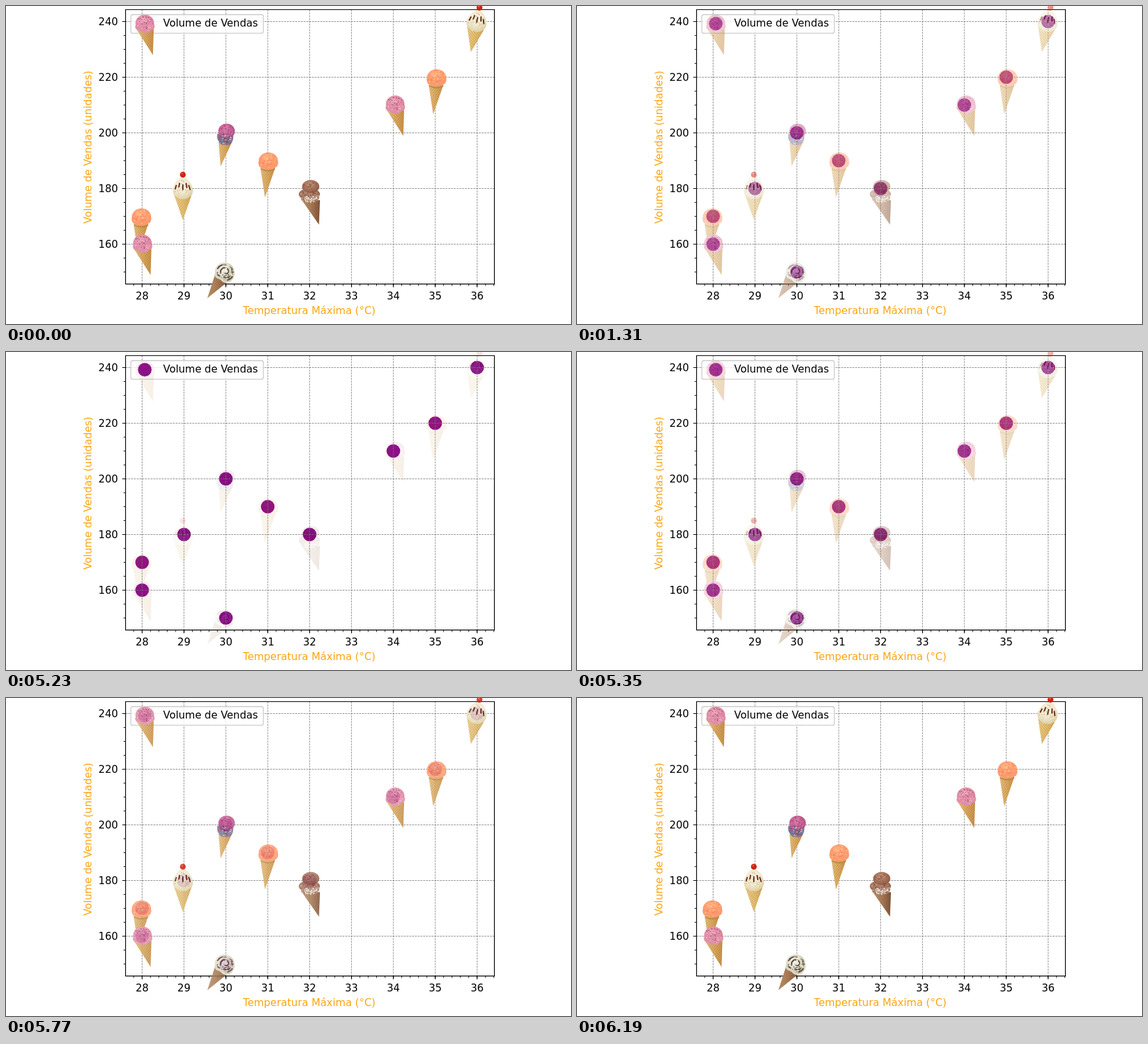
An HTML page that plays this animation: 853 px wide and 480 px high, repeating every 7.46 s.

```html
<!DOCTYPE html>
<html lang="pt">
<head>
<meta charset="utf-8">
<title>Volume de Vendas</title>
<style>
html, body { margin: 0; width: 100%; height: 100%; overflow: hidden; background: #fff; }
svg { display: block; width: 853px; height: 480px; }
text { font: 15.5px "DejaVu Sans", sans-serif; }
.axis { fill: #fca510; }
</style>
</head>
<body>
<svg id="stage" viewBox="0 0 853 480"></svg>
<script>
const LOOP = 7460, STEP = 60;
const L = 180.5, R = 737.4, T = 5.5, B = 419.6;
const px = v => 205.5 + (v - 28) * 63.22;
const py = v => 23.5 + (240 - v) * 4.2;

let seed = 7;
const rnd = () => (seed = (seed * 16807) % 2147483647) / 2147483647;
const range = (a, b, s) => Array.from({ length: Math.round((b - a) / s) + 1 }, (_, i) => a + i * s);
const path = (d, attrs) => `<path d="${d}" ${attrs}/>`;

// Scattered short flecks inside an ellipse.
function flecks(cx, cy, rx, ry, n, colors, size = 1.1) {
  let s = '';
  for (let i = 0; i < n; i++) {
    const a = rnd() * 2 * Math.PI, d = Math.sqrt(rnd());
    const x = cx + Math.cos(a) * d * rx, y = cy + Math.sin(a) * d * ry;
    const dx = (rnd() - .5) * 3, dy = (rnd() - .5) * 2;
    s += path(`M${x.toFixed(1)} ${y.toFixed(1)}l${dx.toFixed(1)} ${dy.toFixed(1)}`,
      `stroke="${colors[i % colors.length]}" stroke-width="${size}" stroke-linecap="round"`);
  }
  return s;
}

const ball = (id, light, mid, dark) => `<radialGradient id="${id}" cx=".42" cy=".36" r=".66">
  <stop offset="0" stop-color="${light}"/><stop offset=".6" stop-color="${mid}"/>
  <stop offset="1" stop-color="${dark}"/></radialGradient>`;
const wafer = (id, light, mid, dark) => `<linearGradient id="${id}">
  <stop offset="0" stop-color="${light}"/><stop offset=".5" stop-color="${mid}"/>
  <stop offset="1" stop-color="${dark}"/></linearGradient>`;
const scoop = (fill, cx, cy, rx, ry) =>
  `<ellipse cx="${cx}" cy="${cy}" rx="${rx}" ry="${ry}" fill="url(#${fill})"/>`;
const cone = (d, fill) => path(d, `fill="url(#${fill})"`) + path(d, 'fill="url(#mesh)"');

const flavours = {
  rose: () => cone('M-12 9L12.3 47L13.5 8Z', 'gold') + scoop('roseBall', 0, -1, 14, 13) +
    path('M-14.5 4Q-14 10-9 9Q-4 15 2 13Q6 15 10 9Q15 10 15 2L12-2H-12Z', 'fill="#e08fa9"') +
    flecks(0, 0, 13, 11, 40, ['#c9668b', '#f3b3c6', '#d67c9c', '#f5bccb'], 1.3) +
    flecks(0, -1, 12, 10, 16, ['#84384f', '#9c4565'], .9),

  peach: () => cone('M-12 9L-5 54L10.5 9Z', 'gold') +
    path('M-11 11Q0 17 10 11', 'fill="none" stroke="#b98a3c" stroke-width="1.5"') +
    scoop('peachBall', 0, -1.5, 14.5, 12.5) +
    path('M-15 0Q-15 9-10 9Q-5 13 0 11Q6 13 10 9Q15 8 15 0Z', 'fill="#fb9a70"') +
    flecks(0, -1, 14, 11, 56, ['#ffb681', '#fb8157', '#ffc493', '#ff8a66', '#fcae62'], 1.4),

  cream: () => cone('M-13 11L0 48L13 11Z', 'honey') +
    path('M-5-15Q0-18 5-15Q14-8 15.3 3Q15 11 10 13Q5 18 0 16Q-5 18-10 13Q-15 11-15.3 3Q-14-8-5-15Z', 'fill="url(#creamBall)"') +
    flecks(0, 5, 13, 9, 36, ['#d1c396', '#fff7de', '#b9b98a', '#e0cfa8']) +
    flecks(0, -9, 7, 5, 12, ['#dccda4', '#fff8e6', '#c5ad86']) +
    path('M-10-4L-11.5 1M-5-7L-6-2M0-5V2M5-7L6-1M9-4L11 2',
      'fill="none" stroke="#64301f" stroke-width="2" stroke-linecap="round"') +
    '<circle cy="-20.3" r="4.4" fill="#cf2412"/><circle cx="-1.2" cy="-22" r="1.1" fill="#f0755c"/>',

  party: () => cone('M-11 13L-8 49L9 13Z', 'gold') +
    path('M-13 0Q-14 9-10 12Q-7 18-2 16Q4 19 8 14Q12 10 11 0Z', 'fill="#84708e"') +
    scoop('partyBall', 1, -4, 12.5, 11.5) +
    flecks(2, -5, 11, 9, 36, ['#d45a91', '#a9437f', '#e58ab2', '#95549a', '#c04c84'], 1.3) +
    flecks(-1, 8, 11, 8, 44, ['#4d82bd', '#574069', '#d3a65f', '#67a8c8', '#a83f72', '#d9c7c8'], 1.4),

  choco: () => cone('M-10 8L14.5 43L16 6Z', 'cocoa') + scoop('chocoBall', 0, -3, 16, 9) +
    path('M-13 2Q-13 8-8 8Q-4 11 1 9Q6 11 10 8Q16 6 15-2Z', 'fill="#b79684"') +
    flecks(1, 4, 13, 5, 34, ['#f0e1d0', '#80594a', '#e3cfba', '#fff4e6'], 1.5) +
    flecks(0, -4, 14, 5, 22, ['#8a5740', '#c9a38b', '#74432f'], 1.3) +
    scoop('chocoBall', 2, -14.5, 13, 10) +
    flecks(2, -14, 11, 8, 28, ['#8f5d46', '#c1907a', '#7b4a37']),

  swirl: () => cone('M-14 3L-26 40L5 15Z', 'cocoa') + scoop('swirlBall', 0, 0, 14.5, 14) +
    path('M-14 3Q-12 11-6 8Q-3 17 5 15Q13 12 14 2', 'fill="none" stroke="#d9d6bd" stroke-width="3.5"') +
    path('M-11-4Q-6-12 3-10M8-8Q13-4 11 3M8 7Q2 11-3 7M-6 3Q-7-4-1-6Q6-6 6 0Q4 5 0 2M-11 4L-7 7M4 13Q10 11 12 7',
      'fill="none" stroke="#584a40" stroke-width="2"') +
    flecks(0, 0, 13, 12, 44, ['#fffdf0', '#5d4e43', '#cbc7ae', '#8c806e', '#f1efdd'], 1.4)
};

const cones = [
  ['rose', 209.5, 27], ['cream', 267, 275], ['peach', 204.5, 319.5], ['rose', 206, 359],
  ['party', 332, 193], ['swirl', 330, 401], ['peach', 396, 235], ['choco', 458, 287],
  ['rose', 587.5, 149], ['peach', 650, 109.5], ['cream', 711, 22.5, 11]
];
const points = [[28, 160], [28, 170], [29, 180], [30, 150], [30, 200],
  [31, 190], [32, 180], [34, 210], [35, 220], [36, 240]];

const xs = range(28, 36, 1), ys = range(160, 240, 20);
const hline = (x, y, w) => `M${x} ${y}h${w}`, vline = (x, y, h) => `M${x} ${y}v${h}`;
const grid = path(xs.map(x => vline(px(x), T, B - T)).join('') + ys.map(y => hline(L, py(y), R - L)).join(''),
  'fill="none" stroke="#707070" stroke-opacity=".85" stroke-width=".9" stroke-dasharray="2.9 1.3"');
const frame = path(`M${L} ${T}H${R}V${B}H${L}Z`, 'fill="none" stroke="#000" stroke-width="1.2"') +
  path(xs.map(x => vline(px(x), B, 5)).join('') + ys.map(y => hline(L - 5, py(y), 5)).join(''),
    'stroke="#000" stroke-width="1.2"') +
  path(range(27.8, 36.4, .2).map(x => vline(px(x).toFixed(2), B, 3)).join('') +
    range(150, 240, 5).map(y => hline(L - 3, py(y), 3)).join(''), 'stroke="#000" stroke-width=".9"');
const legendBox = '<rect x="188.5" y="13" width="200" height="28.2" rx="3" fill="#fff" fill-opacity=".8" stroke="#ccc" stroke-width="1.3"/>';
const dot = (x, y) => `<circle cx="${x}" cy="${y}" r="10.3" fill="#800080"/>`;
const label = (x, y, s, attrs = '') => `<text x="${x}" y="${y}" ${attrs}>${s}</text>`;

const defs = ball('roseBall', '#f0aabd', '#e08ba6', '#d67b98') + ball('peachBall', '#ffb98c', '#ff9a70', '#fa9468') +
  ball('creamBall', '#fbf5e2', '#efe6ca', '#ddd0a8') + ball('partyBall', '#da7fac', '#c0608f', '#a7528a') +
  ball('chocoBall', '#bd8e74', '#a27058', '#8b5a46') + ball('swirlBall', '#f7f5e8', '#dedac8', '#b8b09b') +
  wafer('gold', '#ecc685', '#dfae62', '#cc964c') + wafer('honey', '#f2d594', '#ebc878', '#d9ae5e') +
  wafer('cocoa', '#bf966f', '#a87c5a', '#7d5138') +
  `<pattern id="mesh" width="2.8" height="2.8" patternUnits="userSpaceOnUse" patternTransform="rotate(38)">
    <path d="M0 0H2.8M0 0V2.8" stroke="#7b4a18" stroke-opacity=".38" stroke-width="1"/></pattern>` +
  Object.entries(flavours).map(([id, draw]) => `<g id="${id}" fill="none">${draw()}</g>`).join('');

document.getElementById('stage').innerHTML = `<defs>${defs}</defs>
<g>${points.map(([x, y]) => dot(px(x), py(y))).join('')}${grid}${frame}${legendBox}${dot(209.5, 26.8)}</g>
<g id="treats"><rect width="853" height="480" fill="#fff"/>${grid}${frame}${legendBox}
${cones.map(([id, x, y, a = 0]) => `<use href="#${id}" transform="translate(${x} ${y}) rotate(${a})"/>`).join('')}</g>
${xs.map(x => label(px(x), 443.2, x, 'text-anchor="middle"')).join('')}
${ys.map(y => label(169.2, py(y) + 5.6, y, 'text-anchor="end"')).join('')}
${label(237.3, 31.3, 'Volume de Vendas')}
${label(457.8, 465.3, 'Temperatura Máxima (°C)', 'class="axis" text-anchor="middle"')}
${label(0, 0, 'Volume de Vendas (unidades)', 'class="axis" text-anchor="middle" transform="translate(129 213) rotate(-90)"')}`;

// Share of the ice creams in the crossfade at time t.
function mix(t) {
  const part = (start, steps) => Math.min(1, (Math.floor((t - start) / STEP) + 1) / steps);
  if (t < 1130) return 1;
  if (t < 5230) return 1 - part(1130, 8);
  return 1 - (1 - part(5230, 17)) ** 2.2;
}

const treats = document.getElementById('treats');
function tick() {
  treats.setAttribute('opacity', mix(performance.now() % LOOP));
  requestAnimationFrame(tick);
}
tick();
</script>
</body>
</html>
```
